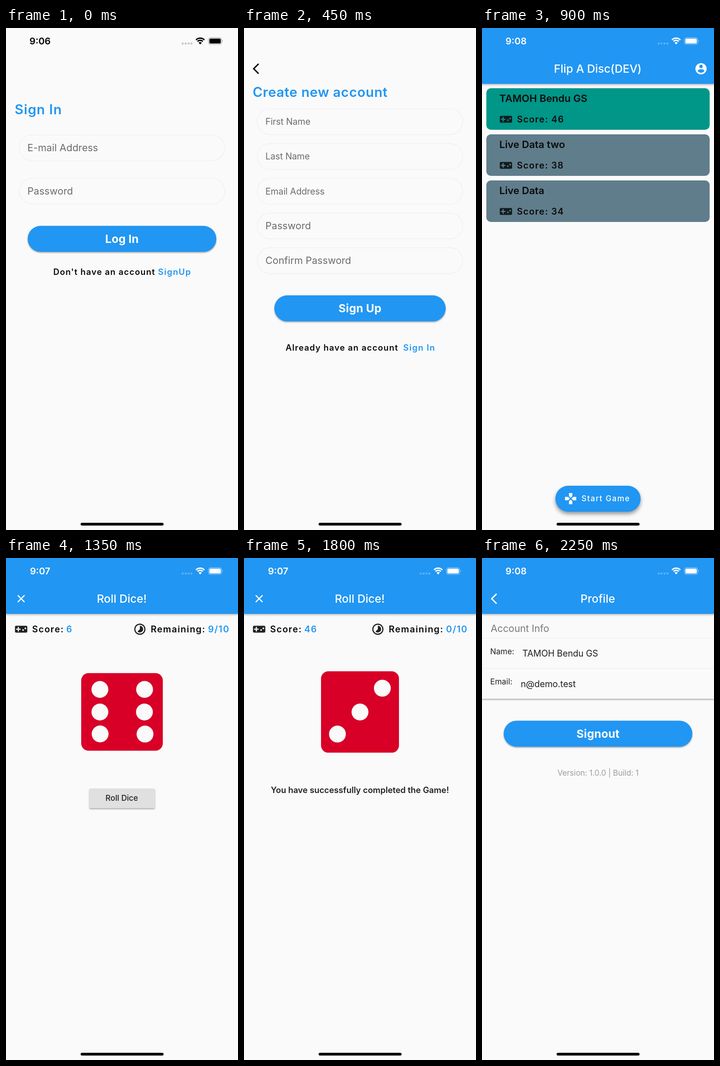
Recreate the animation shown at these times as an HTML page. Size 509 by 1100 pixels, loop 2700 ms.

```html
<!DOCTYPE html>
<html lang="en">
<head>
<meta charset="utf-8">
<title>Dice game walkthrough</title>
<style>
  html, body { margin: 0; width: 100%; height: 100%; overflow: hidden; background: #fafafa; }
  svg { display: block; width: 100%; height: 100%; }
  text { font-family: Inter, Roboto, sans-serif; font-optical-sizing: none; white-space: pre; }
  .low { filter: drop-shadow(0 2px 1.5px #0005); }
  .bar { filter: drop-shadow(0 2px 2px #0004); }
  .high { filter: drop-shadow(0 5px 4px #0006); }
</style>
</head>
<body>
<svg id="stage" viewBox="0 0 509 1100"></svg>
<script>
const BLUE = '#2196f3', PAPER = '#fafafa', INK = '#0b0b0b', DARK = '#212121', HINT = '#6c6c6c';
const HOLD = 450;
const PLAYER = 'TAMOH Bendu GS';

const ICONS = {
  pad: 'M21 6H3c-1.1 0-2 .9-2 2v8c0 1.1.9 2 2 2h18c1.1 0 2-.9 2-2V8c0-1.1-.9-2-2-2zm-10 7H8v3H6v-3H3v-2h3V8h2v3h3v2zm4.5 2a1.5 1.5 0 1 1 0-3 1.5 1.5 0 0 1 0 3zm4-3a1.5 1.5 0 1 1 0-3 1.5 1.5 0 0 1 0 3z',
  user: 'M12 2a10 10 0 1 0 0 20 10 10 0 0 0 0-20zm0 3a3 3 0 1 1 0 6 3 3 0 0 1 0-6zm0 14.2c-2.5 0-4.71-1.28-6-3.22.03-1.99 4-3.08 6-3.08 1.99 0 5.97 1.09 6 3.08-1.29 1.94-3.5 3.22-6 3.22z',
  cross: 'M15 7.5V2H9v5.5l3 3 3-3zM7.5 9H2v6h5.5l3-3-3-3zM9 16.5V22h6v-5.5l-3-3-3 3zM16.5 9l-3 3 3 3H22V9h-5.5z',
  timer: 'M16.24 7.76A6 6 0 0 0 12 6v6l-4.24 4.24a6 6 0 0 0 8.48-8.48zM12 2a10 10 0 1 0 0 20 10 10 0 0 0 0-20zm0 18a8 8 0 1 1 0-16 8 8 0 0 1 0 16z'
};

const text = (s, x, y, size, weight = 400, fill = INK, gap = 0, anchor = 'start') =>
  `<text x="${x}" y="${y}" font-size="${size}" font-weight="${weight}" fill="${fill}" letter-spacing="${gap}" text-anchor="${anchor}">${s}</text>`;
const mid = (s, x, y, size, weight, fill, gap) => text(s, x, y, size, weight, fill, gap, 'middle');
const rect = (x, y, w, h, r, fill, extra = '') =>
  `<rect x="${x}" y="${y}" width="${w}" height="${h}" rx="${r}" fill="${fill}" ${extra}/>`;
const line = (d, color, width) => `<path d="${d}" fill="none" stroke="${color}" stroke-width="${width}"/>`;
const dot = (x, y, r, fill) => `<circle cx="${x}" cy="${y}" r="${r}" fill="${fill}"/>`;
const icon = (name, x, y, fill) =>
  `<path d="${ICONS[name]}" fill="${fill}" transform="translate(${x} ${y}) scale(1.23) translate(-12 -12)"/>`;

const heading = (s, y, gap) => text(s, 19, y, 29.5, 600, BLUE, gap);
const field = (s, y, size) =>
  rect(29, y, 451, 56.5, 28.2, 'none', 'stroke="#efefef" stroke-width="1.3"') +
  text(s, 47, y + 28 + size * .365, size, 400, HINT, size < 20 ? -.1 : .05);
const pill = (s, x, y) =>
  rect(x, y, 509 - 2 * x, 57, 28.5, BLUE, 'class="low"') + mid(s, 254.5, y + 37.4, 24.6, 700, '#fff', .2);
const prompt = (s, x, link, linkX, y) =>
  text(s, x, y, 18.4, 600, INK, 1.2) + text(link, linkX, y, 18.4, 600, BLUE, 1.45);
const chevron = color => line('M32 78.5L21.3 89.2L32 100', color, 3);

function status(time, ink, faint, edge) {
  const arc = (r, w) => {
    const k = r * Math.SQRT1_2;
    return line(`M${426 - k} ${35.3 - k}A${r} ${r} 0 0 1 ${426 + k} ${35.3 - k}`, ink, w);
  };
  return mid(time, 74.8, 36.2, 20.6, 600, ink, 0) +
    [0, 1, 2, 3].map(i => rect(385.5 + i * 6.4, 31.8, 4.4, 4.4, 1.3, faint)).join('') +
    arc(13, 3) + arc(8.3, 3) +
    `<path d="M426 36L422.5 32.3A5 5 0 0 1 429.5 32.3Z" fill="${ink}"/>` +
    rect(444.2, 21.4, 29, 14.6, 4.4, 'none', `stroke="${edge}" stroke-width="1.2"`) +
    rect(446.2, 23.3, 25, 10.8, 2.8, ink) +
    `<path d="M474.6 26.3Q477 28.7 474.6 31.1Z" fill="${edge}"/>`;
}

const appBar = (time, title) =>
  rect(0, -10, 509, 132.5, 0, BLUE, 'class="bar"') +
  status(time, '#fff', '#58b0f6', '#96cdfa') + mid(title, 254, 98, 24.6, 500, '#fff', 0);

const card = (name, score, y, fill) =>
  rect(9.5, y, 490, 91, 10, fill) + text(name, 38, y + 30, 22.1, 600) +
  icon('pad', 52.5, y + 68, '#111c1f') + text(`Score: ${score}`, 76.5, y + 75, 19.67, 600, INK, 1.3);

const play = (score, left) =>
  appBar('9:07', 'Roll Dice!') + line('M25.7 81.7L40.7 96.7M40.7 81.7L25.7 96.7', '#fff', 2.5) +
  icon('pad', 33.2, 156, DARK) + text('Score:', 57.3, 163, 19.67, 600, INK, 1.45) +
  text(score, 132.3, 163, 19.67, 600, BLUE, 1.3) +
  icon('timer', 293.7, 156, DARK) + text('Remaining:', 317.5, 163, 19.67, 600, INK, 1.45) +
  text(`${left}/10`, 443.3, 163, 19.67, 600, BLUE, 1.5);

const die = (x, y, w, h, pips) =>
  rect(x, y, w, h, 16, '#d80027') + pips.map(([px, py]) => dot(px, py, 18.5, PAPER)).join('');

const signIn = status('9:06', '#000', '#c8c8c8', '#a2a2a2') +
  heading('Sign In', 189, 1) +
  field('E-mail Address', 234.3, 21.5) + field('Password', 329.3, 21.5) +
  pill('Log In', 47.5, 433.5) +
  prompt("Don't have an account", 103.8, 'SignUp', 333.5, 541);

const signUp = chevron('#000') + heading('Create new account', 151, .6) +
  ['First Name', 'Last Name', 'Email Address', 'Password', 'Confirm Password']
    .map((s, i) => field(s, 177.3 + i * 76.05, i < 3 ? 19.5 : 21.5)).join('') +
  pill('Sign Up', 66.5, 585.8) +
  prompt('Already have an account', 91.2, 'Sign In', 349.3, 707);

const scores = appBar('9:08', 'Flip A Disc(DEV)') + icon('user', 480.5, 89.2, '#fff') +
  card(PLAYER, 46, 132, '#009688') +
  card('Live Data two', 38, 233, '#607d8b') + card('Live Data', 34, 334, '#607d8b') +
  rect(161, 1003, 187, 57, 28.5, BLUE, 'class="high"') + icon('cross', 194.5, 1031.3, '#fff') +
  text('Start Game', 218.3, 1037.3, 17.2, 500, '#fff', 1.45);

const firstRoll = play(6, 9) +
  die(165, 252.3, 179, 170, [[206, 288], [304, 288], [206, 337.5], [303.7, 337.5], [206.5, 385.5], [305, 385.8]]) +
  rect(183, 505, 143.5, 43.3, 2.5, '#e0e0e0', 'class="low"') + mid('Roll Dice', 254, 532.2, 17.2, 500, DARK, 0);

const lastRoll = play(46, 0) +
  die(169, 248.3, 171, 178.3, [[303.5, 285.3], [254.5, 337.5], [205, 385.8]]) +
  mid('You have successfully completed the Game!', 254.3, 514.7, 18.3, 600, DARK, 0);

const profile = rect(0, 110, 509, 198.5, 0, PAPER, 'class="low"') + appBar('9:08', 'Profile') + chevron('#fff') +
  text('Account Info', 19, 162, 21.5, 400, '#7a7a7a', -.1) +
  line('M0 175.5H509M0 242H509', '#ededed', 1.2) +
  text('Name:', 18, 210.8, 17.2, 400, DARK) + text(PLAYER, 88.5, 216.3, 19.4, 400, DARK, -.1) +
  text('Email:', 18, 277.2, 17.2, 400, DARK, .1) + text('n@demo.test', 85, 282.8, 19.4, 400, DARK, -.1) +
  pill('Signout', 47.5, 356.4) +
  mid('Version: 1.0.0 | Build: 1', 254.5, 476.8, 17.2, 400, '#9e9e9e', -.1);

const screens = [signIn, signUp, scores, firstRoll, lastRoll, profile];
const stage = document.getElementById('stage');
stage.innerHTML = rect(0, 0, 509, 1100, 0, PAPER) +
  screens.map(s => `<g class="screen" display="none">${s}</g>`).join('') +
  rect(163.7, 1084.3, 182, 6, 3, '#000');
const groups = stage.querySelectorAll('.screen');
const start = performance.now();

function draw(now) {
  const current = Math.floor(Math.max(0, now - start) / HOLD) % groups.length;
  groups.forEach((g, i) => g.setAttribute('display', i === current ? 'inline' : 'none'));
  requestAnimationFrame(draw);
}
draw(start);
</script>
</body>
</html>
```
